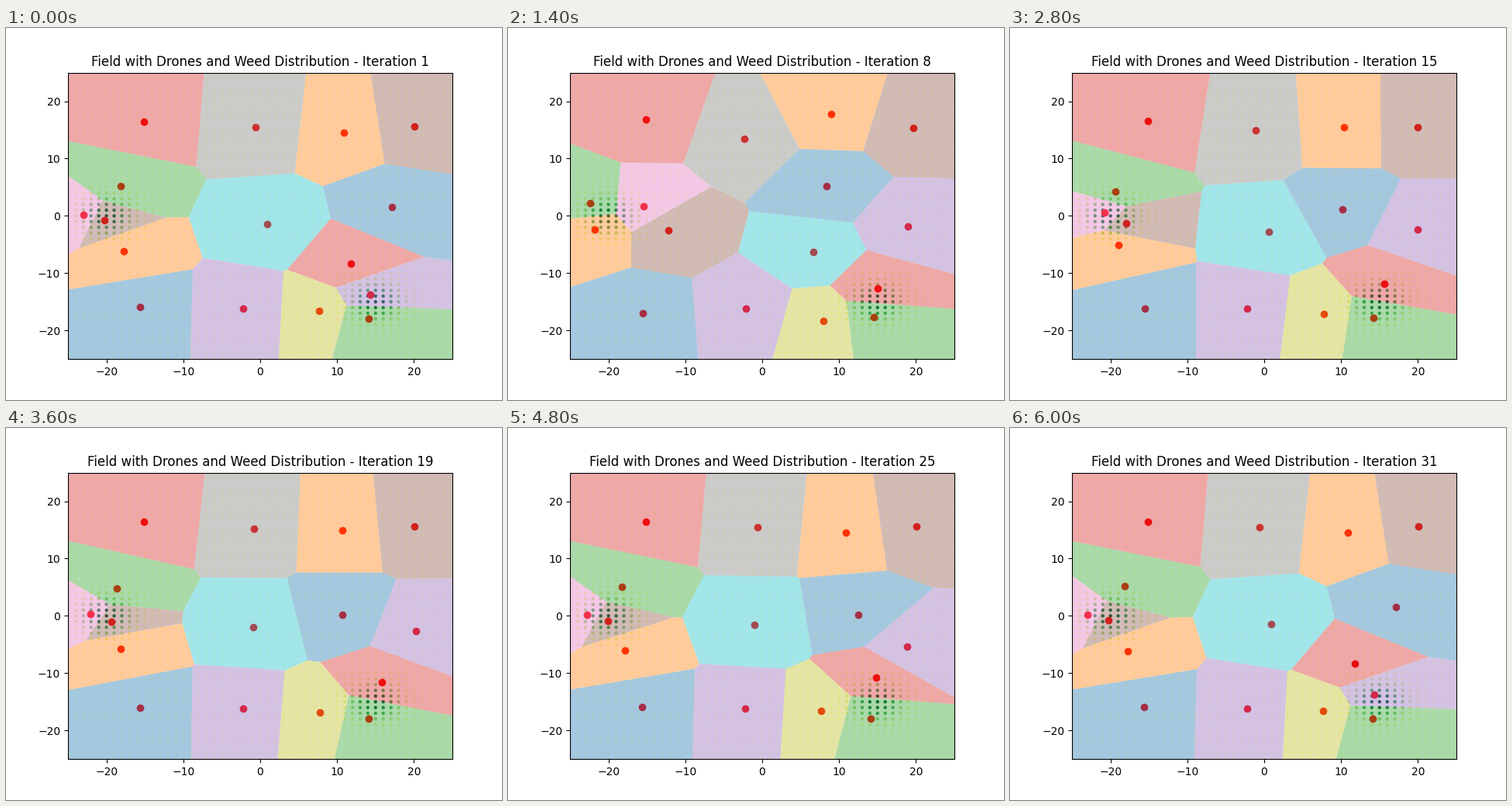
These frames come from a looping animation (640x480 px, 6.2 s). A matplotlib script:

```python
import numpy as np
import matplotlib.pyplot as plt
from matplotlib.animation import FuncAnimation
from matplotlib.colors import to_rgba

HALF = 25
STEPS = 31
REF = 8            # step at which the drones pass their "early" point
LATE = 23          # step at which the wanderers turn to their final point

# cell colour, early point, final point and, for wanderers, a stop between
DRONES = [
    ("C3", (-15.1, 16.8), (-15.1, 16.4)),
    ("C7", (-2.3, 13.4), (-0.6, 15.5)),
    ("C1", (9.0, 17.8), (10.9, 14.5)),
    ("C5", (19.7, 15.3), (20.1, 15.6)),
    ("C2", (-22.4, 2.2), (-18.1, 5.2)),
    ("C6", (-15.4, 1.7), (-23.0, 0.2)),
    ("C5", (-12.2, -2.5), (-20.3, -0.8)),
    ("C1", (-21.8, -2.4), (-17.7, -6.2)),
    ("C0", (-15.5, -17.0), (-15.6, -15.9)),
    ("C4", (-2.1, -16.2), (-2.2, -16.2)),
    ("C8", (8.0, -18.3), (7.7, -16.6)),
    ("C2", (14.5, -17.7), (14.1, -17.9)),
    ("C4", (19.0, -1.8), (14.3, -13.7), (20.4, -2.7)),
    ("C3", (15.0, -12.7), (11.8, -8.3), (15.9, -11.5)),
    ("C0", (8.4, 5.2), (17.2, 1.5), (11.0, -0.5)),
    ("C9", (6.7, -6.3), (0.9, -1.4), (-2.0, -1.4)),
]
early = np.array([d[1] for d in DRONES])
final = np.array([d[2] for d in DRONES])
stop = np.array([d[-1] for d in DRONES])


def drones_at(step):
    """The loop opens on the settled layout, then restarts the search."""
    if step == 1:
        step = STEPS
    settle = np.tanh((step - REF) / (8 if step > REF else 20))
    turn = np.clip((step - LATE) / (STEPS - LATE), 0, 1)
    return early + (stop - early) * settle + (final - stop) * turn


def clip(poly, normal, limit):
    """Keep the part of poly where dot(point, normal) <= limit."""
    d = poly @ normal - limit
    out = []
    for i in range(len(poly)):
        j = (i + 1) % len(poly)
        if d[i] <= 0:
            out.append(poly[i])
        if d[i] * d[j] < 0:
            out.append(poly[i] + (poly[j] - poly[i]) * d[i] / (d[i] - d[j]))
    return np.array(out).reshape(-1, 2)


def cell(points, i):
    """Voronoi cell of point i inside the field."""
    poly = HALF * np.array([[-1., -1], [1, -1], [1, 1], [-1, 1]])
    for j, q in enumerate(points):
        if j != i:
            normal = q - points[i]
            poly = clip(poly, normal, normal @ (q + points[i]) / 2)
    return poly


gx, gy = np.meshgrid(np.arange(-HALF, HALF + 1), np.arange(-HALF, HALF + 1))


def patch(cx, cy):
    return np.exp(-((gx - cx) ** 2 + (gy - cy) ** 2) / 10)


fig, ax = plt.subplots(figsize=(6.4, 4.8), dpi=100)
ax.set_xlim(-HALF, HALF)
ax.set_ylim(-HALF, HALF)
ax.scatter(gx, gy, c=patch(-20, 0) + patch(15, -15), cmap="YlGn",
           s=10, linewidths=0)
dots = ax.scatter(*final.T, c="red", s=36)
cells = [ax.fill([0], [0], fc=to_rgba(d[0], 0.4), lw=0)[0] for d in DRONES]
title = ax.set_title("")


def update(i):
    points = drones_at(i + 1)
    dots.set_offsets(points)
    for k, shape in enumerate(cells):
        shape.set_xy(cell(points, k))
    title.set_text(f"Field with Drones and Weed Distribution - Iteration {i + 1}")
    return [dots, title, *cells]


anim = FuncAnimation(fig, update, frames=STEPS, interval=200,
                     repeat=True, repeat_delay=0, blit=False)
plt.show()
```
